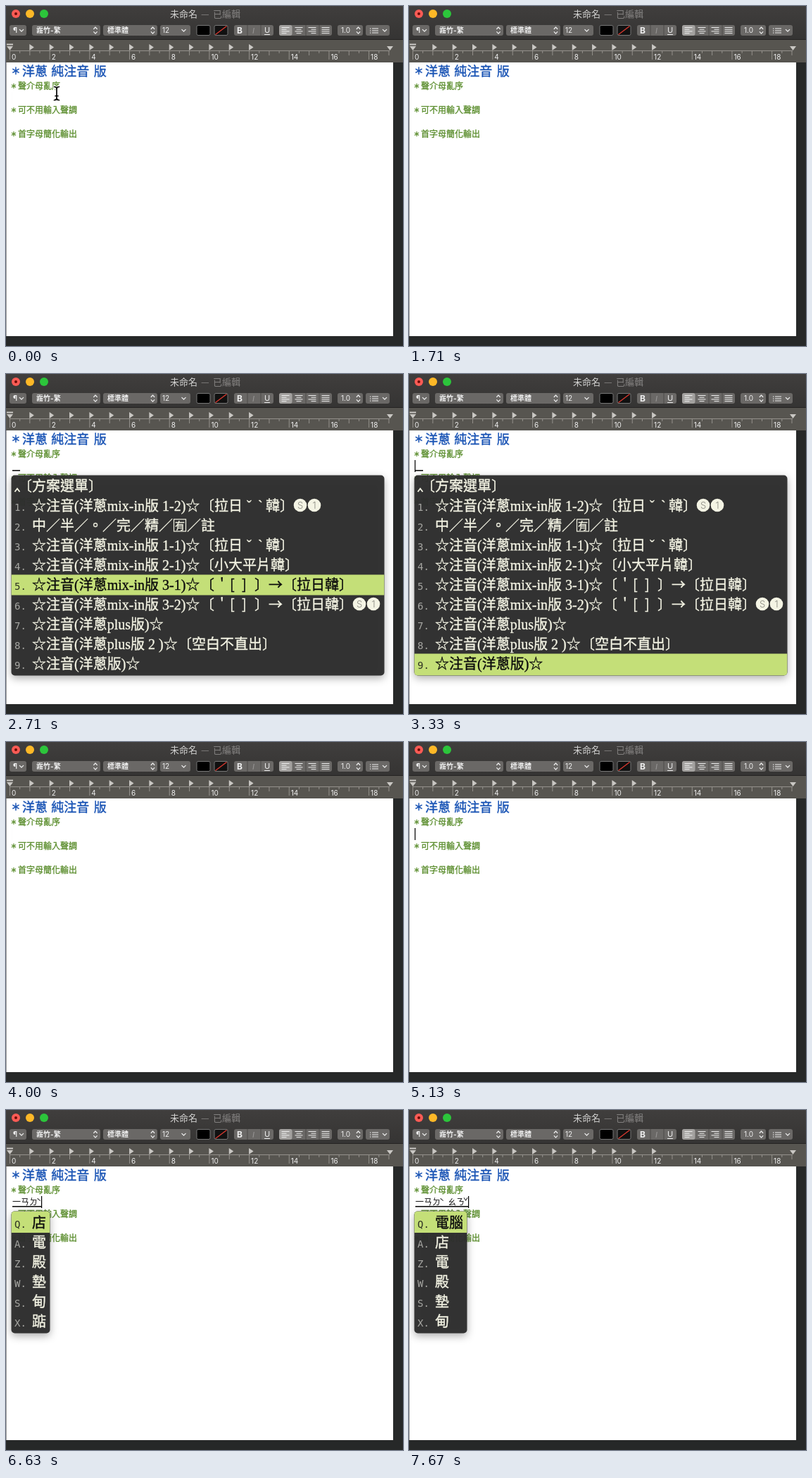
An HTML page that plays this animation: 564x482 px, repeating every 8 s.

```html
<!DOCTYPE html>
<html lang="zh-Hant">
<head>
<meta charset="utf-8">
<title>注音輸入</title>
<style>
html, body { margin: 0; width: 100%; height: 100%; overflow: hidden; background: #262828; }
svg { display: block; width: 564px; height: 482px; }
text { white-space: pre; font-family: "Noto Sans CJK TC", "Noto Sans CJK JP", sans-serif; }
.ui { font-family: Inter, "Noto Sans CJK TC", "Noto Sans CJK JP", sans-serif; font-size: 10px; fill: #f0f0f0; }
.b { font-weight: 700; }
.btn { fill: #6a6866; }
.ln { fill: none; stroke: #ededed; stroke-width: 1.2; stroke-linecap: round; stroke-linejoin: round; }
.blue { font-size: 18px; fill: #1b55b5; stroke: #1b55b5; stroke-width: .4; }
.green { font-size: 12px; fill: #598c2b; stroke: #598c2b; stroke-width: .3; }
.star { font-size: .74em; font-weight: 700; }
.item { font-family: "Liberation Serif", "Noto Sans CJK TC", "Noto Sans CJK JP", serif; font-size: 20px; fill: #f4f4e4; stroke: #f4f4e4; stroke-width: .35; }
.sans { font-family: "Noto Sans CJK TC", "Noto Sans CJK JP", sans-serif; }
.key { font-family: "DejaVu Sans Mono", "Noto Sans Mono", monospace; font-size: 14px; fill: #a6a6a2; }
.badge circle { fill: #f4f4e4; }
.badge text { font: 300 13px Inter, sans-serif; fill: #8b8b82; text-anchor: middle; }
.on .item { fill: #0c0c0c; stroke: #0c0c0c; }
.on .key { fill: #2f3324; }
.box { fill: #2e2e2e; fill-opacity: .965; filter: drop-shadow(0 4px 6px rgba(0, 0, 0, .32)); }
.bar { fill: #c4df78; }
</style>
</head>
<body>
<svg viewBox="0 0 564 482">
  <defs>
    <linearGradient id="top" x2="0" y2="1">
      <stop offset="0" stop-color="#403e3d"/><stop offset="1" stop-color="#353433"/>
    </linearGradient>
    <clipPath id="menuClip"><rect x="7.5" y="143.5" width="530" height="284" rx="5"/></clipPath>
    <clipPath id="candClip"><rect id="candCut" x="7.5" y="143.5" height="173" rx="5"/></clipPath>
  </defs>
  <rect width="564" height="482" fill="#262828"/>
  <rect width="564" height="48" fill="url(#top)"/>
  <g id="chrome"></g>
  <rect y="80" width="550" height="388" fill="#fff"/>
  <rect y="80" width=".7" height="388" fill="#777"/>
  <g id="doc"></g>
  <text id="typed" y="135" font-size="12" fill="#111"></text>
  <rect id="under" x="9" y="136" height="1.6" fill="#111"/>
  <rect id="caret" y="122" width="1.2" height="17" fill="#000"/>
  <g id="menu">
    <rect class="box" x="7.5" y="143.5" width="530" height="284" rx="5"/>
    <rect id="menuBar" class="bar" x="7.5" width="530" clip-path="url(#menuClip)"/>
    <path d="M12.5 167l3.5-4.5 3.5 4.5" fill="none" stroke="#f4f4e4" stroke-width="1.8"/>
    <text class="item" x="17" y="165.5">〔方案選單〕</text>
    <g id="menuRows"></g>
  </g>
  <g id="cand">
    <rect id="candBox" class="box" x="7.5" y="143.5" height="173" rx="5"/>
    <rect id="candBar" class="bar" x="7.5" y="143.5" height="30.5" clip-path="url(#candClip)"/>
    <g id="candRows"></g>
  </g>
  <g id="mouse" fill="none" stroke-linecap="round"></g>
</svg>
<script>
const $ = id => document.getElementById(id);
const text = (x, y, s, cls = 'ui', more = '') => `<text x="${x}" y="${y}" class="${cls}" ${more}>${s}</text>`;
const span = (x, s, cls = '') => `<tspan x="${x}" class="${cls}">${s}</tspan>`;
const path = (d, more = 'class="ln"') => `<path d="${d}" ${more}/>`;
const rect = (x, y, w, h, more) => `<rect x="${x}" y="${y}" width="${w}" height="${h}" ${more}/>`;
const button = (x1, x2) => rect(x1, 27, x2 - x1, 15, 'rx="3" class="btn"');
const down = x => path(`M${x - 2.7} 33.3l2.7 2.7 2.7-2.7`);
const updown = x => path(`M${x - 2.3} 32.5l2.3-2.5 2.3 2.5M${x - 2.3} 36.7l2.3 2.5 2.3-2.5`);

function titleBar() {
  let s = '';
  ['#fc5b55', '#fdb827', '#2cc53b'].forEach((c, i) => s += `<circle cx="${14 + 20 * i}" cy="11" r="6" fill="${c}"/>`);
  s += '<circle cx="14" cy="11" r="2" fill="#6d0c08"/>';
  s += text(233, 16, '未命名', '', 'font-size="13" fill="#d2d2d1"');
  s += text(277, 16, '—', '', 'font-size="13" fill="#858382"');
  return s + text(294, 16, '已編輯', '', 'font-size="13" fill="#858382"');
}

function toolBar() {
  let s = '';
  [[5, 29], [37, 134], [138, 215], [219, 262], [324, 380], [388, 463], [471, 507], [511, 545]]
    .forEach(b => s += button(...b));
  s += text(10, 38, '¶', 'ui b') + down(22);
  s += text(43, 38, '霧竹-繁', 'ui b') + updown(127);
  s += text(144, 38, '標準體', 'ui b') + updown(208.5);
  s += text(222, 38, '12') + down(252.5);
  s += rect(271, 27.5, 19, 14, 'rx="2" fill="#000" stroke="#777"');
  s += rect(296, 27.5, 19, 14, 'rx="2" fill="#111" stroke="#777"');
  s += path('M297.5 40.5L313.5 28.5', 'stroke="#d8392f" stroke-width="1.4"');
  [342.5, 361.5, 425.5, 444.5].forEach(x => s += rect(x, 27, 1, 15, 'fill="#4c4a49"'));
  s += text(328, 38.5, 'B', 'ui b', 'style="font-size:12px"');
  s += text(350, 38.5, 'I', 'ui', 'style="font-size:11px;font-style:italic;fill:#9a9897"');
  s += text(367, 38, 'U', 'ui', 'style="font-size:11px"') + path('M367.5 40.5h7');
  s += rect(388, 27, 18.5, 15, 'rx="3" fill="#a3a19f"');
  for (let i = 0; i < 4; i++) for (let j = 0; j < 4; j++) {
    const w = i == 3 || j % 2 == 0 ? 11 : 7, x = 391.5 + 19 * i + [0, (11 - w) / 2, 11 - w, 0][i];
    s += rect(x, 30 + 2.7 * j, w, 1, 'fill="#f0f0f0"');
  }
  s += text(476, 38, '1.0') + updown(500.5);
  for (let j = 0; j < 3; j++)
    s += rect(517, 31.5 + 3 * j, 1.3, 1.2, 'fill="#eee"') + rect(520, 31.5 + 3 * j, 9, 1, 'fill="#eee"');
  return s + down(538);
}

function ruler() {
  let s = rect(0, 47, 564, 1, 'fill="#242322"') + rect(0, 48, 564, 32, 'fill="#575550"');
  s += rect(5, 63, 540, 1, 'fill="#94918c"');
  for (let i = 0; i <= 38; i++) {
    const x = 5 + 14.17 * i;
    s += rect(x, 63, 1, i % 4 == 0 ? 13 : i % 2 == 0 ? 7 : 4, 'fill="#94918c"');
    if (i % 4 == 0) s += text(x + 3, 76, i / 2);
    if (i % 2 == 0 && i > 0 && i < 25) s += path(`M${x} 54l6.5 4.5-6.5 4.5z`, 'fill="#c9c7c3"');
  }
  s += rect(1, 53.5, 9, 2, 'fill="#c9c7c3"');
  [5.5, 545.5].forEach(x => s += path(`M${x - 4.5} 57h9l-4.5 6z`, 'fill="#c9c7c3"'));
  return s;
}

// a line led by a small bold star centred in one character cell
function starred(cls, size, y, s) {
  const star = `<tspan class="star" x="${5 + size * .13}" dy="${-size * .1}">＊</tspan>`;
  return text(5, y, `${star}<tspan x="${5 + size}" dy="${size * .1}">${s}</tspan>`, cls);
}

const badges = (x, y) => ['S', '1'].map((c, i) =>
  `<g class="badge"><circle cx="${x + 20 * i}" cy="${y}" r="9.3"/><text x="${x + 20 * i}" y="${y + 4.7}">${c}</text></g>`).join('');
const tones = span(276, '〔拉日') + span(342, 'ˇ') + span(358, 'ˋ') + span(369, '韓〕');
const marks = span(276, '〔') + span(304, "'", 'sans') + span(318, '[', 'sans') + span(335, ']', 'sans')
  + span(353, '〕') + span(373, '→', 'sans') + span(393, '〔拉日韓〕');
const mix = v => `☆注音(洋蔥mix-in版 ${v})☆`;
const schemes = [mix('1-2') + tones, '中／半／。／完／精／' + span(257, '／註'), mix('1-1') + tones,
  mix('2-1') + span(276, '〔小大平片韓〕'), mix('3-1') + marks, mix('3-2') + marks,
  '☆注音(洋蔥plus版)☆', '☆注音(洋蔥plus版 2 )☆' + span(244, '〔空白不直出〕'), '☆注音(洋蔥版)☆'];
const boxed = y => rect(238.5, y - 16, 17, 17, 'fill="none" stroke="#f4f4e4" stroke-width="1.2"')
  + text(240, y - 2.3, '有', 'item', 'style="font-size:14px"');
const extras = { 0: y => badges(418, y - 8), 1: boxed, 5: y => badges(502, y - 8) };

const row = (key, body, y, extra = '') => `<g>${text(12, y, key + '.', 'key')}${text(37, y, body, 'item')}${extra}</g>`;

$('chrome').innerHTML = titleBar() + toolBar() + ruler();
$('doc').innerHTML = starred('blue', 18, 99, '洋蔥' + span(64.3, '純注音') + span(124.8, '版'))
  + ['聲介母亂序', '可不用輸入聲調', '首字母簡化輸出'].map((s, i) => starred('green', 12, 118 + 34 * i, s)).join('');
$('menuRows').innerHTML = schemes.map((s, i) => {
  const y = 194 + 28 * i;
  return row(i + 1, s, y, extras[i] ? extras[i](y) : '');
}).join('');
const beam = 'M-3.5-9.5Q0-9.5 0-6.5Q0-9.5 3.5-9.5M0-6.5V6.5M-3.5 9.5Q0 9.5 0 6.5Q0 9.5 3.5 9.5M-2 3.5H2';
$('mouse').innerHTML = path(beam, 'stroke="#fff" stroke-width="3.6"') + path(beam, 'stroke="#000" stroke-width="1.7"');

const glyphs = [[9, '一'], [21, 'ㄢ'], [33, 'ㄉ'], [43, 'ˋ'], [55, 'ㄠ'], [67, 'ㄋ'], [77, 'ˇ']];
// time, end of the typed text, candidates
const keys = [
  [5620, 21, '一 以 亦 意 義 易'],
  [5840, 33, '眼 言 研 嚴 演 煙'],
  [6060, 45, '點 店 電 典 墊 殿'],
  [6300, 50, '店 電 殿 墊 甸 踮'],
  [6960, 67, '店凹 店 電 殿 墊 甸'],
  [7270, 79, '電腦 店 電 殿 墊 甸'],
  [7520, 84, '電腦 店 電 殿 墊 甸']
];
const LOOP = 8000, OPEN = 1760, CLOSE = 3850;
const show = (id, on) => $(id).style.display = on ? '' : 'none';
const clamp = v => Math.max(0, Math.min(1, v));
let shown = null;

function setTyped(n) {
  if (n === shown) return;
  shown = n;
  show('cand', n > 0);
  $('typed').innerHTML = glyphs.slice(0, n).map(p => span(...p)).join('');
  if (!n) return;
  const list = keys[n - 1][2].split(' '), w = 35 + 20 * list[0].length;
  ['candBox', 'candBar', 'candCut'].forEach(id => $(id).setAttribute('width', w));
  $('candRows').innerHTML = list.map((c, i) => row('QAZWSX'[i], c, 167 + 28 * i)).join('');
  $('candRows').firstChild.setAttribute('class', 'on');
}

function setMenu(t) {
  const sel = Math.max(0, Math.min(8, Math.floor((t - 2080) / 155)));
  $('menuBar').setAttribute('y', 172.5 + 28 * sel);
  $('menuBar').setAttribute('height', sel == 8 ? 31 : 29);
  [...$('menuRows').children].forEach((g, i) => g.setAttribute('class', i == sel ? 'on' : ''));
}

function draw(t) {
  const n = keys.filter(k => t >= k[0]).length, menu = t >= OPEN && t < CLOSE;
  setTyped(n);
  show('menu', menu);
  if (menu) setMenu(t);

  const end = n ? keys[n - 1][1] : 8, p = t % 1000;
  show('under', menu || n);
  $('under').setAttribute('width', n ? end - 9 : 11);
  $('caret').setAttribute('x', end);
  $('caret').setAttribute('opacity', t >= 5100 ? 1 : Math.min(clamp(p / 110), clamp((460 - p) / 110)));

  show('mouse', t < 650);
  const u = clamp((t - 20) / 560), e = u * u * (3 - 2 * u);
  $('mouse').setAttribute('transform', `translate(${72 + 6 * e} ${124 + 89 * e})`);
}

const t0 = performance.now();
(function loop() {
  draw((performance.now() - t0) % LOOP);
  requestAnimationFrame(loop);
})();
</script>
</body>
</html>
```
